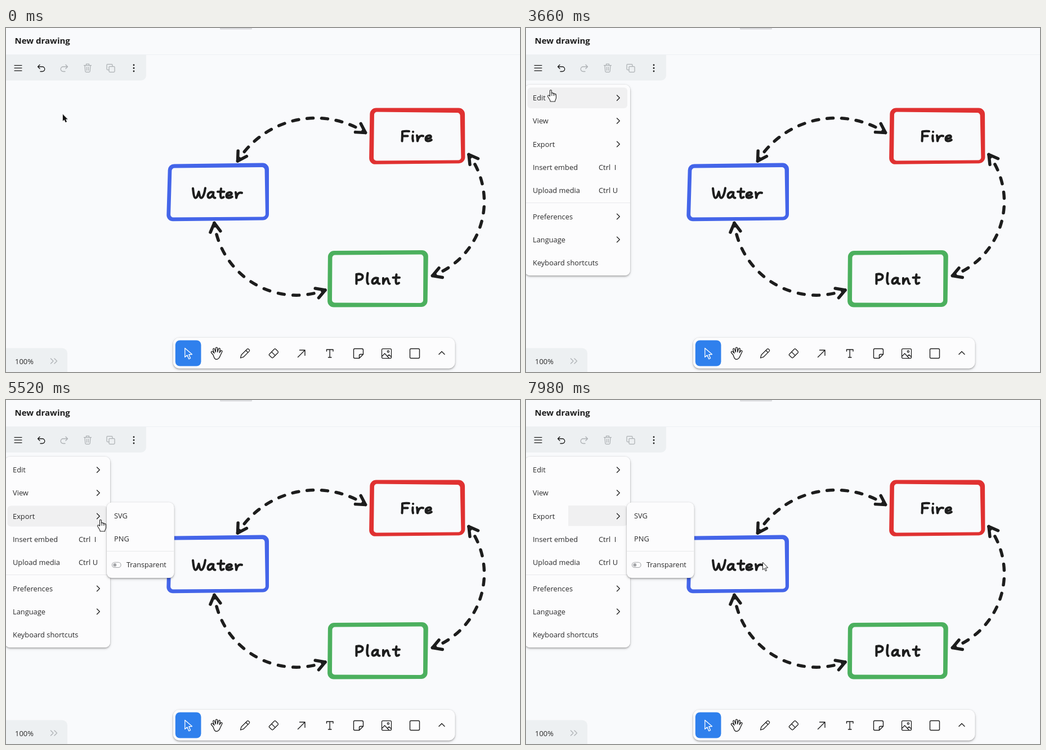
An HTML page with a canvas that plays this animation: 913 by 613 pixels, repeating every 8 s.

```html
<!DOCTYPE html>
<html lang="en">
<head>
<meta charset="utf-8">
<title>Drawing board</title>
<style>
  html, body { margin: 0; width: 100%; height: 100%; overflow: hidden; background: #f9fafc; }
  canvas { display: block; width: 913px; height: 613px; }
</style>
</head>
<body>
<canvas id="stage" role="img" aria-label="Diagram of Water, Fire and Plant with an export menu"></canvas>
<script>
const W = 913, H = 613, LOOP = 8000;
const INK = '#1d1d1d', FADED = '#adb1b4', PANEL = '#fcfcfd', LOW = '#edf0f2', HOVER = '#f0f0f1';
const FONT = '"Open Sans", "Noto Sans", sans-serif';
const canvas = document.getElementById('stage');
const ctx = canvas.getContext('2d');
const dpr = window.devicePixelRatio || 1;
canvas.width = W * dpr;
canvas.height = H * dpr;

// ---------- helpers ----------
function text(s, x, y, size = 12.85, color = '#2a2a2b', weight = 400, align = 'left') {
  ctx.font = `${weight} ${size}px ${FONT}`;
  ctx.fillStyle = color;
  ctx.textAlign = align;
  ctx.fillText(s, x, y);
}
function box(x, y, w, h, r, fill) {
  ctx.beginPath();
  ctx.roundRect(x, y, w, h, r);
  ctx.fillStyle = fill;
  ctx.fill();
}
function line(d, color = INK, width = 1.25, fill) {
  const p = new Path2D(d);
  if (fill) { ctx.fillStyle = fill; ctx.fill(p); }
  ctx.strokeStyle = color;
  ctx.lineWidth = width;
  ctx.stroke(p);
}
function dot(x, y, r, color) {
  ctx.beginPath();
  ctx.arc(x, y, r, 0, 7);
  ctx.fillStyle = color;
  ctx.fill();
}
function panel(x, y, w, h, r) {
  ctx.save();
  for (const [blur, dy, a] of [[2, 0, .16], [3, 2, .24], [6, 2, .1]]) {
    ctx.shadowColor = `rgba(0,0,0,${a})`;
    ctx.shadowBlur = blur * dpr;
    ctx.shadowOffsetY = dy * dpr;
    box(x, y, w, h, r, PANEL);
  }
  ctx.restore();
}
function at(x, y, draw) {
  ctx.save();
  ctx.translate(x, y);
  draw();
  ctx.restore();
}

// ---------- diagram ----------
function ring(points, r) {
  const n = points.length, [a, b] = [points[0], points[n - 1]];
  ctx.moveTo((a[0] + b[0]) / 2, (a[1] + b[1]) / 2);
  points.forEach((p, i) => ctx.arcTo(...p, ...points[(i + 1) % n], r));
  ctx.closePath();
}
function frame(color, outer, inner) {
  ctx.beginPath();
  ring(outer, 11);
  ring(inner, 5);
  ctx.fillStyle = color;
  ctx.fill('evenodd');
}
function circleThrough([ax, ay], [mx, my], [bx, by]) {
  const p = mx - ax, q = my - ay, u = bx - mx, v = by - my;
  const e = (p * (ax + mx) + q * (ay + my)) / 2;
  const f = (u * (mx + bx) + v * (my + by)) / 2;
  const det = p * v - q * u;
  const x = (e * v - q * f) / det, y = (p * f - u * e) / det;
  return { x, y, r: Math.hypot(ax - x, ay - y) };
}
function head(x, y, angle) {
  ctx.beginPath();
  for (const turn of [-Math.PI / 6, Math.PI / 6]) {
    ctx.moveTo(x, y);
    ctx.lineTo(x + 18 * Math.cos(angle + turn), y + 18 * Math.sin(angle + turn));
  }
  ctx.stroke();
}
function arrow(a, mid, b, ccw) {
  const c = circleThrough(a, mid, b), dir = ccw ? -1 : 1;
  const from = Math.atan2(a[1] - c.y, a[0] - c.x), to = Math.atan2(b[1] - c.y, b[0] - c.x);
  const sweep = ((to - from) * dir + 4 * Math.PI) % (2 * Math.PI);
  const period = sweep * c.r / 10, dash = 11;
  ctx.strokeStyle = INK;
  ctx.lineWidth = 5.5;
  ctx.setLineDash([dash, period - dash]);
  ctx.lineDashOffset = dash / 2;
  ctx.beginPath();
  ctx.arc(c.x, c.y, c.r, from, to, ccw);
  ctx.stroke();
  ctx.setLineDash([]);
  head(...a, from + dir * Math.PI / 2);
  head(...b, to - dir * Math.PI / 2);
}

// Hand lettering: advance and pen strokes, baseline at 0
const GLYPHS = {
  W: [26, 'M2 -19C3 -10 4 -2 6.5 -2C9.5 -2 11 -9 12.5 -13C13.5 -8 14.5 -2 17 -2C20 -2 23 -12 24 -19.5'],
  F: [18, 'M2.5 -2C3 -8 3 -14 3 -19C7 -20 11 -20 15 -19.5M3 -11H12.5'],
  P: [18, 'M3 -2V-19M3 -18.5C9 -21 15 -18 14 -13.5C13 -9.5 8 -8.5 4 -8.5'],
  a: [18, 'M11.5 -11.5C8 -14 2 -11 2 -5.5C2 -1 7.5 -1 11 -8M12 -12C11 -7 11 -2 15 -2'],
  e: [16, 'M2.5 -6.5C7 -6 12 -7.5 11.2 -10.5C10 -13.5 2 -12 2 -6C2 -1 8 -1.2 12.3 -4'],
  i: [8, 'M3 -12C2.5 -8 2.5 -5 3.5 -2M3.5 -18.5h.1'],
  l: [9, 'M4 -21C2.5 -12 2.5 -3 5 -2'],
  n: [18, 'M2.5 -12V-2C4 -8 7 -12 9.5 -11.5C12 -11 10.5 -2.5 14 -2'],
  r: [15, 'M2 -12C3 -8 3 -5 3 -2C4 -8 7 -13 13 -11'],
  t: [14, 'M7 -18.5C6 -12 5 -2 8 -2C9.5 -2 10.5 -2.5 11.5 -3.5M1 -13H12.5']
};
function letter(word, x, y, gap) {
  for (const ch of word) {
    const [advance, d] = GLYPHS[ch];
    at(x, y, () => line(d, INK, 4.1));
    x += advance + gap;
  }
}
function diagram() {
  arrow([411.5, 237], [546, 160.5], [638.5, 186.5], false);
  arrow([822, 225.5], [849.5, 309], [757.5, 441.5], false);
  arrow([370, 347.5], [462, 466], [567, 467], true);
  frame('#4465e9', [[288, 242.5], [467, 240.5], [467, 342.5], [285, 344.5]],
    [[294.5, 249.5], [459.5, 248], [461, 336.5], [292, 337.5]]);
  frame('#e03131', [[646.5, 142.5], [815, 142.5], [815.5, 241], [645, 243]],
    [[654, 149.5], [806.5, 151], [808.5, 235.5], [653, 236.5]]);
  frame('#4cb05e', [[572, 397], [750, 396], [748.5, 497], [571, 497.5]],
    [[579.5, 404.5], [741.5, 403.5], [741, 490], [579, 489.5]]);
  letter('Water', 330, 304.8, .5);
  letter('Fire', 701, 203.5, .5);
  letter('Plant', 619.5, 457.8, 1);
}

// ---------- chrome ----------
function header(hover) {
  ctx.fillStyle = '#eef1f4';
  ctx.fillRect(0, 47, W, 1);
  box(380, -2, 57, 4.5, 1, '#d9dadd');
  text('New drawing', 15.5, 28, 15, INK, 700);
  box(0, 48, 249, 45.5, [0, 0, 9, 0], LOW);
  if (hover === 'menu') box(3, 52, 36.5, 37, 7, '#e0e4e7');
  if (hover === 'undo') box(43.5, 52, 37, 37, 7, '#e0e4e7');
  line('M15 66.5H28M15 71.25H28M15 76H28');
  const back = 'M4 -6L.5 -2.5L4 1M.5 -2.5H8.5A4.2 4.2 0 0 1 8.5 6H5';
  at(56, 71.5, () => line(back, INK, 1.3));
  at(110, 71.5, () => { ctx.scale(-1, 1); line(back, FADED, 1.3); });
  line('M138.5 66.5H151.5M142.5 66V64H147.5V66M140 66.5L140.8 77Q141 78.5 142.5 78.5H147.5Q149 78.5 149.2 77L150 66.5M143.5 69.5V75.5M146.5 69.5V75.5', FADED);
  line('M182.5 74.5H180.5Q179 74.5 179 73V66Q179 64.5 180.5 64.5H187.5Q189 64.5 189 66V68M184.5 68.5H191.5Q193 68.5 193 70V77Q193 78.5 191.5 78.5H184.5Q183 78.5 183 77V70Q183 68.5 184.5 68.5Z', FADED);
  for (const y of [66, 71.5, 77]) dot(227, y, 1.4, INK);
}
function footer() {
  box(0, 570.5, 109, 43, [0, 9, 0, 0], LOW);
  text('100%', 16, 598.5, 13);
  line('M79.5 589L84 593.5L79.5 598M86 589L90.5 593.5L86 598', FADED);

  panel(297, 552, 500.5, 54.5, 11);
  box(300.8, 556.5, 45.7, 46, 8, '#2f80ed');
  line('M317.8 570.5V586.5L321.8 583L324.8 589.8L327.6 588.5L324.8 582L330.5 581.5Z', '#fff', 1.3);
  line('M368 582.5L364.8 578.8C363.5 577 365.8 575.2 367.5 577L370 579.5L367.8 573.2C367.3 571 369.8 570.3 370.5 572.3L372.5 577.5V571C372.5 568.6 375.5 568.6 375.6 571L375.8 577.5L377.5 571.8C378.2 569.8 380.7 570.4 380.3 572.6L379.2 578.5L381.4 575.5C382.7 573.8 384.8 575.2 383.8 577L380.5 584C379 588.5 377.5 590.5 373.5 590.5C370 590.5 369.5 586.5 368 582.5Z', INK, 1.3);
  line('M416.5 588L418 582.5L428.2 572.3Q429.6 571 431 572.3L432 573.3Q433.3 574.7 432 576.1L421.8 586.3ZM426 574.5L429.8 578.3');
  line('M467.5 581.5L476.5 572.3Q477.8 571 479.1 572.3L483 576.2Q484.2 577.5 483 578.8L474.5 587.3Q473.2 588.5 471.9 587.3L467.5 583Q466.8 582.2 467.5 581.5ZM471.8 577.2L478.3 583.6');
  line('M518.5 586.5L531 574M521.5 574H531V583.5', INK, 1.4);
  line('M569.5 576V573H581V576M575.2 573V587M572.5 587H578', INK, 1.4);
  line('M619.5 571.5H632Q634.5 571.5 634.5 574V581.5L627.5 588.5H619.5Q617.5 588.5 617.5 586.5V573.5Q617.5 571.5 619.5 571.5ZM634.5 581.5H629.5Q627.5 581.5 627.5 583.5V588.5', INK, 1.4);
  const square = 'M2 0H15Q17 0 17 2V15Q17 17 15 17H2Q0 17 0 15V2Q0 0 2 0Z';
  at(667.5, 571.5, () => line(square + 'M0 14L5.2 8.5L13 17M10 13.5L12.8 10.8L17 14.5M13 5A1.6 1.6 0 1 1 9.8 5A1.6 1.6 0 1 1 13 5Z'));
  at(717.5, 571.5, () => line(square, INK, 1.4));
  line('M769 581.5L774 576.5L779 581.5', INK, 1.4);
}

// ---------- menus ----------
const MENU = [
  ['Edit', 124.5, '>'], ['View', 165.5, '>'], ['Export', 207, '>'],
  ['Insert embed', 248, 'I'], ['Upload media', 289.5, 'U'],
  ['Preferences', 336, '>'], ['Language', 377, '>'], ['Keyboard shortcuts', 418, '']
];
const SUB = [['SVG', 206.5], ['PNG', 247.5]];
const rowAt = (rows, y) => (rows.find(r => Math.abs(y - r[1]) <= 20.5) || [])[0];

function mainMenu(hover, trail) {
  panel(-2, 101, 187, 340, 9);
  ctx.fillStyle = '#e8e9eb';
  ctx.fillRect(0, 311, 185, 1);
  if (trail) box(75, 188, 105, 36.5, [0, 6, 6, 0], HOVER);
  for (const [name, y, mark] of MENU) {
    if (hover === name) box(2.5, y - 18.5, 177.5, 37, 6, HOVER);
    text(name, 12, y + 4.7);
    if (mark === '>') line(`M161.5 ${y - 4.8}L166.3 ${y}L161.5 ${y + 4.8}`);
    else if (mark) {
      text('Ctrl', 129, y + 4.7);
      text(mark, 158.5, y + 4.7, 12.85, '#2a2a2b', 400, 'center');
    }
  }
}
function subMenu(hover) {
  panel(179, 182.5, 119.5, 134.5, 9);
  ctx.fillStyle = '#e8e9eb';
  ctx.fillRect(179, 269, 119.5, 1);
  for (const [name, y] of SUB) {
    if (hover === name) box(182.5, y - 18.5, 111, 37, 6, HOVER);
    text(name, 192, y + 4.5);
  }
  line('M193 289.3H199.5A4.6 4.6 0 0 1 199.5 298.5H193A4.6 4.6 0 0 1 193 289.3Z', '#a3a5a8', 1.1);
  dot(193.3, 293.9, 2.9, '#a3a5a8');
  text('Transparent', 214, 298.2, 12.6);
}
function tooltip() {
  box(258.5, 263.5, 27, 18, 4, '#fff');
  ctx.strokeStyle = '#6c6c6e';
  ctx.lineWidth = 1;
  ctx.stroke();
  text('PNG', 261.5, 277, 10.2);
}

// ---------- pointer ----------
const PATH = [
  [0, 101, 154], [1290, 101, 154], [2080, 50, 98], [2350, 40, 87], [2690, 38, 82],
  [3450, 38, 82], [3660, 44, 110], [4370, 93, 197], [4620, 106, 203], [5180, 106, 203],
  [5520, 168, 213], [5970, 239, 235], [6180, 259, 245], [7230, 259, 245],
  [7260, 263, 247], [7980, 420, 289], [8000, 420, 289]
];
// Smooth monotone curve through the stops
function track(t, axis) {
  const slope = k => {
    const a = PATH[k], b = PATH[k + 1];
    return a && b ? (b[axis] - a[axis]) / (b[0] - a[0]) : 0;
  };
  const tangent = k => {
    const a = slope(k - 1), b = slope(k);
    return a * b > 0 ? 2 * a * b / (a + b) : 0;
  };
  let i = 0;
  while (i < PATH.length - 2 && t >= PATH[i + 1][0]) i++;
  const [a, b] = [PATH[i], PATH[i + 1]];
  const h = b[0] - a[0], u = (t - a[0]) / h, v = 1 - u;
  return Math.round(a[axis] * v * v * (1 + 2 * u) + b[axis] * u * u * (3 - 2 * u)
    + h * u * v * (v * tangent(i) - u * tangent(i + 1)));
}
const POINTERS = {
  dark() {
    const d = 'M0 0V11.5L2.6 9.2L4.8 14L6.9 13L4.8 8.4H8.2Z';
    line(d, '#fff', 1.6);
    line(d, '#111', .3, '#111');
  },
  light() { line('M.5 .5V13.7L3.4 11L5.5 15.8L7.5 14.9L5.4 10.2L9.4 9.9Z', '#222', 1, '#fff'); },
  hand() {
    line('M-1.5 11.5V1.8C-1.5 0 1.5 0 1.5 1.8V6.5C1.8 5.2 4.5 5.2 4.5 7.2C5 6 7 6.2 7 8C7.6 7 9.5 7.4 9.5 9.2V14.5C9.5 16.5 7.8 17.5 7.5 21H-.7C-.8 18.5 -2.5 17 -3.5 15L-5.2 12.2C-6.2 10.4 -4 9.2 -2.8 10.3Z', '#222', 1.1, '#fff');
    line('M1.5 6V10.5M4.5 7V10.5M7 8V10.5', '#222', .9);
  }
};

// ---------- scene ----------
function draw(t) {
  const x = track(t, 1), y = track(t, 2);
  const menuOpen = t >= 2940, subOpen = t >= 4530;
  const inSub = subOpen && x > 179 && x < 298 && y > 183 && y < 317;
  const inMenu = menuOpen && !inSub && x < 185 && y > 101 && y < 441;
  const onBar = t >= 2100 && !menuOpen;

  ctx.setTransform(dpr, 0, 0, dpr, 0, 0);
  ctx.lineCap = ctx.lineJoin = 'round';
  ctx.fillStyle = '#f9fafc';
  ctx.fillRect(0, 0, W, H);
  diagram();
  header(onBar && (x > 39 ? 'undo' : 'menu'));
  footer();
  if (menuOpen) mainMenu(inMenu && rowAt(MENU, y), subOpen && !inMenu);
  if (subOpen) subMenu(inSub && x < 294 && rowAt(SUB, y));
  if (t >= 6730 && t < 7290) tooltip();

  let kind = 'light';
  if (t < 2100) kind = 'dark';
  else if (t < 3000 || inMenu || inSub) kind = 'hand';
  at(x, y, POINTERS[kind]);
}

const start = performance.now();
function tick(now) {
  draw(Math.max(0, now - start) % LOOP);
  requestAnimationFrame(tick);
}
draw(0);
requestAnimationFrame(tick);
</script>
</body>
</html>
```
